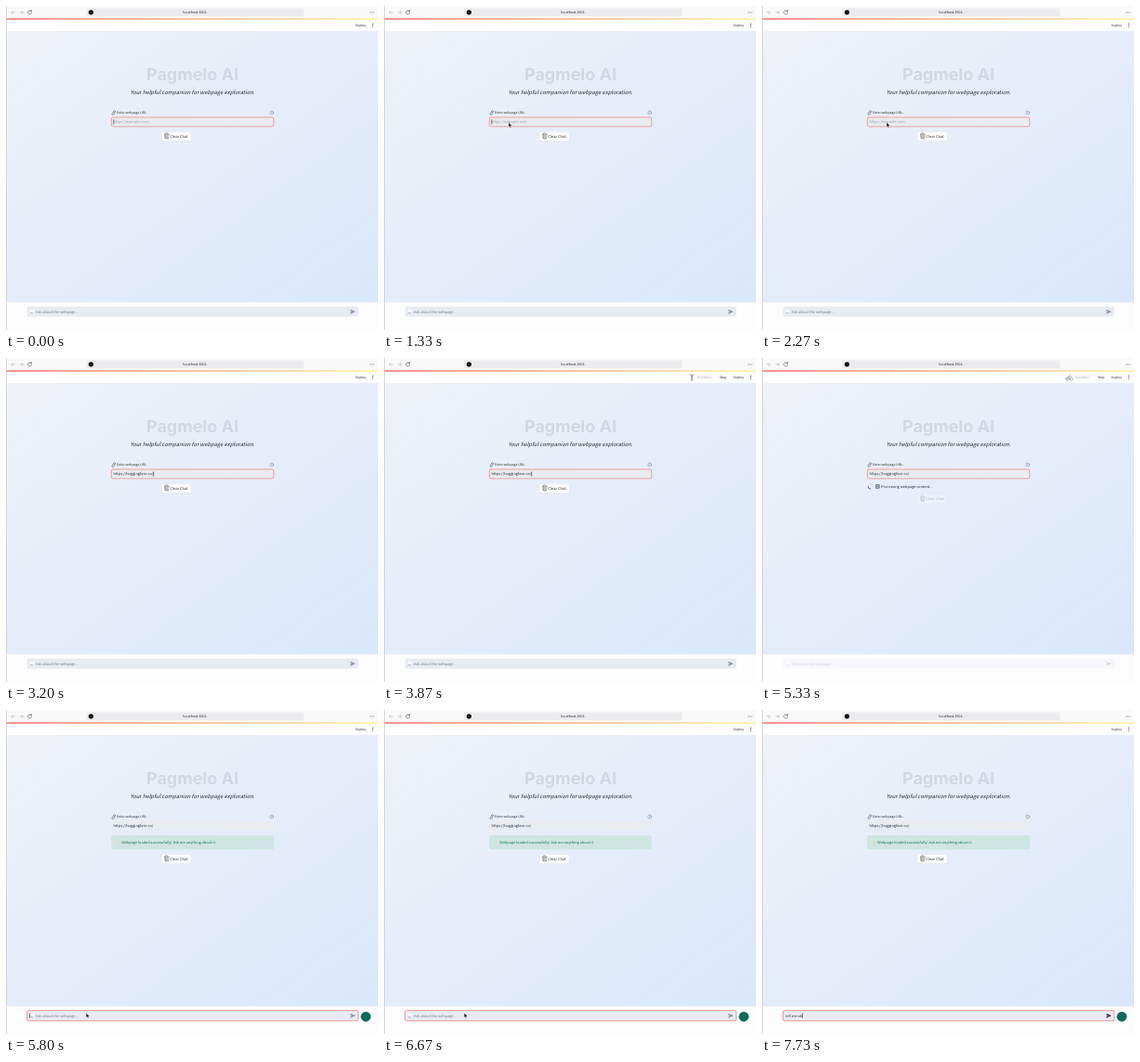
These frames come from a looping animation (400 by 349 pixels, 8 s). An HTML page:

```html
<!DOCTYPE html>
<html lang="en">
<head>
<meta charset="utf-8">
<title>Pagmelo AI</title>
<style>
  html, body { margin: 0; width: 100%; height: 100%; overflow: hidden; background: #fff; }
  svg { display: block; width: 100vw; height: 100vh; }
  text {
    font: 3.93px "Noto Sans CJK JP", "Noto Sans CJK SC", "Noto Sans", sans-serif;
    fill: #2b2e38; white-space: pre; text-rendering: geometricPrecision;
  }
  .small { font-size: 3.5px; }
  .hint { fill: #9a9fa9; }
  .line { fill: none; stroke-linecap: round; stroke-linejoin: round; }
</style>
</head>
<body>
<svg viewBox="0 0 400 349">
  <defs>
    <linearGradient id="sky" x1="0" y1="0" x2="1" y2="1">
      <stop offset="0" stop-color="#eff2f6"/><stop offset="1" stop-color="#d9e7fc"/>
    </linearGradient>
    <linearGradient id="stripe">
      <stop offset="0" stop-color="#ff4b4b"/><stop offset="1" stop-color="#fff07c"/>
    </linearGradient>
  </defs>

  <!-- Browser bar -->
  <rect width="400" height="349" fill="#fdfdfe"/>
  <rect width="400" height="13.5" fill="#f9f9fa"/>
  <rect x="86" y="2.4" width="234.5" height="8.8" rx="1.6" fill="#ebebed"/>
  <circle cx="91.4" cy="6.8" r="2.6" fill="#111"/>
  <text x="203" y="8.2" text-anchor="middle" style="font-size:3.75px">localhost:8501</text>
  <g class="line" stroke="#b4b4b8" stroke-width=".6">
    <path d="M9.6 6.9H5.8m1.6-1.7L5.8 6.9l1.6 1.7M14.8 6.9h3.8m-1.6-1.7 1.6 1.7-1.6 1.7"/>
    <path d="M27.3 5.7a2.1 2.1 0 1 0 .3 1.7M27.5 4.4v1.5H26" stroke="#55565a"/>
  </g>
  <path d="M391.7 6.9h.01m1.8 0h.01m1.8 0h.01" class="line" stroke="#555" stroke-width=".9"/>

  <!-- App header -->
  <rect y="13.4" width="400" height="1.2" fill="url(#stripe)"/>
  <text class="small" x="375.6" y="21.9">Deploy</text>
  <path d="M394.5 18.9v.01m0 1.7v.01m0 1.7v.01" class="line" stroke="#333" stroke-width=".9"/>
  <g id="running">
    <path id="athlete" class="line" stroke="#85888f" stroke-width=".65"/>
    <text x="336.8" y="21.8" style="font-size:3.3px;fill:#b0b3ba">RUNNING...</text>
    <text class="small" x="360.9" y="21.9">Stop</text>
  </g>

  <!-- Page -->
  <rect y="27" width="400" height="292.3" fill="url(#sky)"/>
  <text x="200.5" y="80.3" text-anchor="middle"
    style="font:700 18px Inter,'Liberation Sans',sans-serif;fill:#d2d8e2">Pagmelo AI</text>
  <text x="200.4" y="95.2" text-anchor="middle" style="font-size:5.85px;font-style:italic">Your helpful companion for webpage exploration.</text>

  <g class="line" stroke="#4e535d" stroke-width=".6">
    <path d="m115.3 115.2 1.4-1.4m-1.7.1.9-.9a1 1 0 0 1 1.5 1.5l-.9.9m-1.4-.7-.9.9a1 1 0 0 0 1.5 1.5l.9-.9"/>
    <circle cx="285.7" cy="114.9" r="1.9" stroke="#777c86" stroke-width=".45"/>
  </g>
  <text x="285.7" y="116" text-anchor="middle" style="font-size:2.9px;fill:#666b75">?</text>
  <text class="small" x="119" y="116.1">Enter webpage URL:</text>
  <rect id="urlBox" x="113.3" y="119.9" width="174.5" height="10" rx="1.8" fill="#e8ebef" stroke-width=".7"/>
  <text id="url" x="115.5" y="126.4"></text>
  <path id="urlCaret" stroke="#222" stroke-width=".6"/>

  <g id="processing">
    <circle cx="116.6" cy="138.4" r="2.7" fill="none" stroke="#d2d8e1" stroke-width=".8"/>
    <path id="spinner" d="M116.6 135.7a2.7 2.7 0 0 1 2.7 2.7" class="line" stroke="#50555f" stroke-width=".8"/>
    <rect x="121.9" y="136" width="4.7" height="4.7" rx=".8" fill="#66798c"/>
    <path d="M123 138a1.4 1.4 0 0 1 2.5 0m0 .8a1.4 1.4 0 0 1-2.5 0" class="line" stroke="#fff" stroke-width=".6"/>
    <text x="128" y="139.9">Processing webpage content...</text>
  </g>

  <g id="success">
    <rect x="113.2" y="135.1" width="174.7" height="15.1" rx="1.8" fill="#cfe5e2"/>
    <path d="m120.3 140.5.6 1.7 1.7.6-1.7.6-.6 1.7-.6-1.7-1.7-.6 1.7-.6z" fill="#e3d9b0"/>
    <text x="124.2" y="144.2" style="fill:#1c7a4b">Webpage loaded successfully! Ask me anything about it.</text>
  </g>

  <g id="clear">
    <rect x="167.1" y="135.6" width="31.9" height="9.6" rx="1.8" fill="#fff" stroke="#d9dee6" stroke-width=".4"/>
    <path d="M170.2 138h5.2m-4.7 0 .5 5h3.2l.5-5m-2.7.6v3.8m1.2-3.8-.1 3.8m-2.2-3.8.1 3.8m.3-5v-.6h2v.6" class="line" stroke="#60656d" stroke-width=".5"/>
    <text x="176.3" y="141.8" style="font-size:4.05px">Clear Chat</text>
  </g>

  <!-- Chat bar -->
  <g id="chat">
    <rect id="chatBox" x="22.6" y="323.7" width="356.2" height="11.1" rx="1.8" fill="#e8ecf2" stroke-width=".7"/>
    <g id="chatHint">
      <rect x="25.2" y="326.8" width="4.8" height="3.9" rx="1.5" fill="#f6f8fb"/>
      <path d="M26.2 330.7h.01m1.4 0h.01m1.4 0h.01" class="line" stroke="#70757e" stroke-width=".7"/>
      <text class="hint" x="31.9" y="330.7" style="fill:#777d88">Ask about the webpage...</text>
    </g>
    <text id="message" x="25.2" y="330.7"></text>
    <path id="send" d="m370.4 326.9 5.4 2.4-5.4 2.4v-1.9l3-.5-3-.5z"/>
  </g>
  <path id="chatCaret" stroke="#222" stroke-width=".6"/>
  <circle id="badge" cx="386.9" cy="330.3" r="5.4" fill="#0b6b5c"/>

  <rect width=".7" height="349" fill="#c4c6ca"/>
  <path id="pointer" d="M0 0v4.7l1.1-1 .8 1.8.9-.4-.8-1.7h1.5z" fill="#111" stroke="#fff" stroke-width=".3"/>
</svg>

<script>
const LOOP = 8000;
const PASTE = 2700, RUN = 3500, SPIN = 4130, STALE = 5150, DONE = 5470, FOCUS = 5700;
const URL_TEXT = "https://huggingface.co/";
const MESSAGE = "tell me ab";
const KEY_TIMES = [6730, 6830, 6930, 7000, 7100, 7200, 7270, 7370, 7500, 7730];
// Cyclist, runner, gymnast, swimmer
const ATHLETES = [
  "M328.2 22.6m-1.5 0a1.5 1.5 0 1 0 3 0a1.5 1.5 0 1 0-3 0M331 22.6a1.5 1.5 0 1 0 3 0a1.5 1.5 0 1 0-3 0M328.3 22.4l1.3-2.5 1.6 1.2-.5 1.8M329.6 19.9l1.5-1.2 1.5 1.5M331.8 17.5v.01",
  "M331.8 17.8v.01M331.2 19l-1 2.3 1.5 1.2-.6 2M330.2 21.3l-1 1.6h-1.5M331.2 19l-1.9.4-.6 1.3M331.2 19l1.2 1.3 1.2-.4",
  "M331 17.6v.01M328.7 17.5l1.3 1.5h2l1.3-1.5M331 19v2.3M330.6 19v2.5l-.2 2.8M331.4 19v2.5l.2 2.8",
  "M332.9 20.5v.01M328.2 21.4l2-1.7 1.8 1.7M330.2 19.7l1.5-.8M327.9 23q.9-.8 1.8 0t1.8 0 1.8 0"
];

const ui = Object.fromEntries([...document.querySelectorAll("svg [id]")].map(e => [e.id, e]));
const within = (t, from, to) => t >= from && t < to;
const progress = (t, from, to) => Math.min(1, Math.max(0, (t - from) / (to - from)));
const ease = p => p * p * (3 - 2 * p);
const show = (node, on) => node.setAttribute("visibility", on ? "visible" : "hidden");
const set = (node, name, value) => node.setAttribute(name, value);
const blink = (t, start) => (t - start) % 1000 < 500;

function placeCaret(caret, field, empty, y, on) {
  const x = 115.5 * (field === ui.url) + 25.2 * (field === ui.message)
    + (empty ? 0 : field.getComputedTextLength()) + .3;
  set(caret, "d", `M${x} ${y}v5.2`);
  show(caret, on);
}

function drawPointer(t) {
  const early = within(t, 670, PASTE);
  const [from, to, p] = early
    ? [[172, 92], [134, 125.6], ease(progress(t, 670, 1300))]
    : [[134, 125.6], [86.2, 326.6], ease(progress(t, 5400, 5680))];
  const [x, y] = from.map((v, i) => v + (to[i] - v) * p);
  set(ui.pointer, "transform", `translate(${x} ${y})`);
  show(ui.pointer, early || within(t, 5400, KEY_TIMES[0]));
}

function render(t) {
  const pasted = t >= PASTE, focused = t >= FOCUS, done = t >= DONE;
  const processing = within(t, SPIN, DONE);

  ui.url.textContent = pasted ? URL_TEXT : "https://example.com";
  set(ui.url, "class", pasted ? "" : "hint");
  set(ui.urlBox, "stroke", focused ? "none" : "#f47c7c");
  const earlyCaret = !within(t, 200, 500) && !within(t, 1000, 1300) && !within(t, 2030, 2500);
  placeCaret(ui.urlCaret, ui.url, !pasted, 122.4,
    !focused && (pasted ? blink(t, 2730 - 1000) : earlyCaret));

  show(ui.running, within(t, RUN, DONE + 60));
  set(ui.athlete, "d", ATHLETES[Math.floor(Math.max(0, t - RUN) / 150) % 4]);
  show(ui.processing, processing);
  set(ui.spinner, "transform", `rotate(${(t - SPIN) * .45} 116.6 138.4)`);
  show(ui.success, done);

  const opacity = done ? 1 : 1 - .68 * progress(t, STALE, STALE + 130);
  set(ui.clear, "opacity", opacity);
  set(ui.clear, "transform", `translate(0 ${done ? 20 : processing ? 11.5 : 0})`);
  set(ui.chat, "opacity", opacity);

  const typed = KEY_TIMES.filter(k => t >= k).length;
  ui.message.textContent = MESSAGE.slice(0, typed);
  show(ui.chatHint, !typed);
  set(ui.send, "fill", typed ? "#22252d" : "#858b97");
  set(ui.chatBox, "stroke", focused ? "#f46a6f" : "none");
  placeCaret(ui.chatCaret, ui.message, !typed, 326.6, focused && (typed > 0 || blink(t, FOCUS)));
  show(ui.badge, focused);
  drawPointer(t);
}

const start = performance.now();
function tick() {
  render((performance.now() - start) % LOOP);
  requestAnimationFrame(tick);
}
tick();
</script>
</body>
</html>
```
